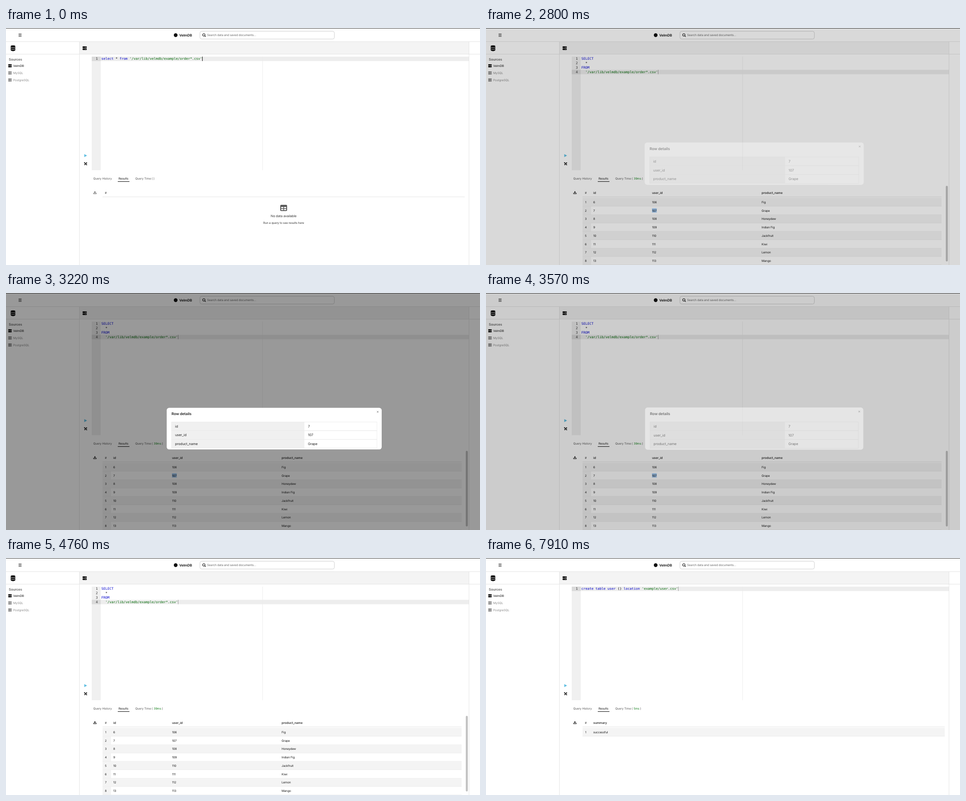
Recreate the animation shown at these times as an HTML page. Size 1056 by 530 pixels, loop 8000 ms.

```html
<!DOCTYPE html>
<html lang="en">
<head>
<meta charset="utf-8">
<title>Query editor</title>
<style>
html, body { margin: 0; width: 100%; height: 100%; overflow: hidden; background: #fff; }
svg { display: block; width: 1056px; height: 530px; }
text { font-family: Inter, "Noto Sans", sans-serif; letter-spacing: -.012em; white-space: pre; text-rendering: geometricPrecision; }
.code { font-family: "DejaVu Sans Mono", monospace; font-size: 7.46px; letter-spacing: 0; }
.key { fill: #00c; }
.str { fill: #036a07; }
</style>
</head>
<body>
<svg id="stage" viewBox="0 0 1056 530"></svg>
<script>
const LOOP = 8000, STEP = 70;
const LINE = 9.85, CHAR = 4.491, TOP = 64, CODE_X = 212.5;
const ROW = 18.75, TABLE_Y = 380;

const rect = (x, y, w, h, fill, extra = '') =>
  `<rect x="${x}" y="${y}" width="${w}" height="${h}" fill="${fill}" ${extra}/>`;
const path = (d, extra) => `<path d="${d}" ${extra}/>`;
const group = (id, body) => `<g id="${id}">${body}</g>`;
// y is the middle of the line
const label = (x, y, str, size = 6.5, fill = '#111', extra = '') =>
  `<text x="${x}" y="${y + size * .36}" font-size="${size}" fill="${fill}" ${extra}>${str}</text>`;
const bold = (x, y, str, size, fill) => label(x, y, str, size, fill, 'font-weight="600"');
const middle = (x, y, str, size, fill) => label(x, y, str, size, fill, 'text-anchor="middle"');
const key = s => `<tspan class="key">${s}</tspan>`;
const str = s => `<tspan class="str">${s}</tspan>`;

const code = lines => lines.map((line, i) => {
  const y = TOP + LINE * i + 7.3;
  return `<text class="code" x="${CODE_X}" y="${y}">${line}</text>` +
    `<text class="code" x="204.6" y="${y}" text-anchor="end" fill="#333">${i + 1}</text>`;
}).join('');

const server = (x, y, w, fill) => {
  const h = w * .4;
  return [0, h + w * .09].map(dy =>
    rect(x, y + dy, w, h, fill, `rx="${w * .12}"`) +
    [.66, .82].map(k => `<circle cx="${x + w * k}" cy="${y + dy + h / 2}" r="${w * .055}" fill="#fff"/>`).join('')
  ).join('');
};

const source = (name, y, fill) => server(5, y - 3.5, 7.8, fill) + label(16, y, name, 6.55, fill);

const database = () =>
  path('M10.4 41.2v7.6c0 3.9 10.4 3.9 10.4 0v-7.6z', 'fill="#111"') +
  '<ellipse cx="15.6" cy="41.1" rx="5.2" ry="2.3" fill="#111"/>' +
  [41.9, 45.8].map(y => path(`M10.2 ${y}c1 2.7 9.8 2.7 10.8 0`, 'fill="none" stroke="#fff" stroke-width=".8"')).join('');

const tools = () =>
  path('M175.4 301.4l4 4M179.6 301.2l-4.1 4.2', 'stroke="#111" stroke-width="1.3"') +
  path('M174 300.2l2 .3.3 2-1.4.2-1.1-1.2zM179 304.2l2 1.8-1.3 1.3-1.9-2z', 'fill="#111"') +
  path('M178.4 302.5l.3-2 1.3-.4-.3 1.3 1.3-.3-.3 1.3zM176.7 304.6l-.2 1.9-1.4.6.1-1.2-1.1.1.5-1.3z', 'fill="#111"');

const download = () =>
  path('M197.3 365h1.6v2.5h1.5l-2.3 2.2-2.3-2.2h1.5z', 'fill="#111"') +
  path('M195.1 368.6v2.2h6v-2.2', 'fill="none" stroke="#111" stroke-width="1.1"');

const frame = () =>
  rect(0, 0, 1056, 530, '#fff') +
  rect(163, 31, 869, 28, '#f4f4f4') +
  path('M0 30.5H1056M0 58.5H1056M163.5 31V530M1031.5 31V530', 'stroke="#e4e4e4" fill="none"') +
  path('M28 13.3h6.6M28 16h6.6M28 18.7h6.6', 'stroke="#111" stroke-width="1.1"') +
  '<circle cx="378" cy="16" r="4.2" fill="#111"/>' +
  bold(386, 16, 'VelmDB', 7.6) +
  rect(432, 7.3, 299.6, 17.4, '#fff', 'rx="4" stroke="#c9c9c9" stroke-width=".9"') +
  '<circle cx="440.8" cy="15.4" r="2.6" fill="none" stroke="#111" stroke-width="1.1"/>' +
  path('M442.7 17.3l2.3 2.3', 'stroke="#111" stroke-width="1.3"') +
  label(448, 16, 'Search data and saved documents...', 6.5, '#666') +
  database() + server(170.6, 41, 9.4, '#111') +
  bold(6.3, 70, 'Sources', 7.6, '#666') +
  source('VelmDB', 84.5, '#111') + source('MySQL', 100.5, '#888') + source('PostgreSQL', 116.3, '#888') +
  path('M174.4 281.9l6.2 3.4-6.2 3.4z', 'fill="#62bfe2"') + tools() +
  label(194.4, 336.5, 'Query History', 6.46, '#555') + label(250.8, 336.5, 'Results', 6.5) +
  rect(249, 342.8, 26, 1.1, '#111');

const editor = () =>
  rect(191, TOP, 20, 254, '#f0f0f0') +
  group('active', rect(191, TOP, 20, LINE, '#dadada') + rect(211, TOP, 820, LINE, '#ededed')) +
  rect(571.2, TOP, .9, 254, '#ebebeb') +
  group('selection', rect(211, TOP, 820, LINE * 4, '#fff') +
    rect(CODE_X, TOP, 1031 - CODE_X, LINE * 3, '#b5d5ff') +
    rect(CODE_X, TOP + LINE * 3, CHAR * 38, LINE, '#b5d5ff')) +
  group('typed', code([`${key('select')} * ${key('from')} ${str("'/var/lib/velmdb/example/order*.csv'")}`])) +
  group('formatted', code([key('SELECT'), '  *', key('FROM'), `  ${str("'/var/lib/velmdb/example/order*.csv'")}`])) +
  group('create', code([`${key('create table user')} () ${key('location')} ${str("'example/user.csv'")}`])) +
  rect(0, TOP, 1, LINE, '#000', 'id="caret"');

const rule = right => path(`M215 377.7H${right}`, 'stroke="#e4e4e4"');
const stripe = (i, right) => {
  const y = TABLE_Y + ROW * i;
  return rect(215, y, i % 2 ? 19 : right - 215, ROW, '#f4f4f4') +
    rect(215, y + ROW - .5, right - 215, .6, '#e6e6e6') +
    middle(222.2, y + 9.5, i + 1, 6.4);
};
const time = (value, end) => label(288, 336.5, 'Query Time (', 6.46, '#555') +
  label(329, 336.5, value, 6.46, '#0a7a12') + label(end, 336.5, ')', 6.46, '#555');

const empty = () =>
  label(288, 336.5, 'Query Time ( )', 6.46, '#555') + rule(1022) +
  rect(611, 395.6, 15.2, 13.6, '#555', 'rx="2"') +
  [[613, 400], [619.4, 400], [613, 404.4], [619.4, 404.4]].map(([x, y]) => rect(x, y, 4.8, 2.9, '#fff')).join('') +
  middle(618.5, 420.3, 'No data available', 7.25, '#333') +
  middle(618.5, 435.5, 'Run a query to see results here', 6.35, '#333');

const orders = () => {
  const fruit = ['Fig', 'Grape', 'Honeydew', 'Indian Fig', 'Jackfruit', 'Kiwi', 'Lemon', 'Mango'];
  const columns = [[239, 'id'], [370, 'user_id'], [614, 'product_name']];
  return time('39ms', 347.4) + rule(1015) +
    columns.map(([x, name]) => bold(x, 368.2, name, 6.85, '#333')).join('') +
    fruit.map((name, i) => {
      const y = TABLE_Y + ROW * i + 9.5;
      return stripe(i, 1015) +
        (i === 1 ? rect(369.8, y - 5, 10.6, 9.4, '#a3cbf5', 'id="picked"') : '') +
        label(239, y, i + 6) + label(370, y, i + 106) + label(614, y, name);
    }).join('') +
    rect(1024.4, 353, 4.4, 169, '#c1c1c1', 'rx="2"');
};

const summary = () => time('5ms', 343.2) + rule(1022) + bold(239, 368.2, 'summary', 6.85, '#333') +
  stripe(0, 1022) + label(239, TABLE_Y + 9.5, 'successful');

const modal = () => {
  const rows = [['id', '7'], ['user_id', '107'], ['product_name', 'Grape']];
  return rect(358, 256.8, 479, 93, '#fff', 'rx="5.5"') +
    bold(368.8, 270.3, 'Row details', 8.2, '#222') +
    path('M826.4 264l3.4 3.4M829.8 264l-3.4 3.4', 'stroke="#555" stroke-width=".8"') +
    rows.map(([name, value], i) => {
      const y = 288.5 + 19.4 * i;
      return rect(368.8, y, 296, 19.4, '#f0f0f0') +
        rect(368.8, y, 457.4, 19.4, 'none', 'stroke="#e6e6e6" stroke-width=".7"') +
        label(376.7, y + 9.7, name, 7.6, '#222') + label(672.7, y + 9.7, value, 7.5, '#222');
    }).join('');
};

document.getElementById('stage').innerHTML =
  frame() + editor() +
  group('download', download()) + middle(222.2, 368.2, '#', 6.5, '#333') +
  group('empty', empty()) + group('orders', orders()) + group('summary', summary()) +
  rect(0, 1, 1056, 529, '#000', 'id="mask"') + group('modal', modal()) +
  rect(0, 0, 1056, 1, '#333');

const el = id => document.getElementById(id);
const show = (id, on) => el(id).setAttribute('visibility', on ? 'visible' : 'hidden');
const within = (t, from, to) => t >= from && t < to;

// the CSS "ease" curve
function ease(x) {
  if (x <= 0) return 0;
  if (x >= 1) return 1;
  const bezier = (u, a, b) => 3 * u * (1 - u) ** 2 * a + 3 * u * u * (1 - u) * b + u ** 3;
  let low = 0, high = 1;
  for (let i = 0; i < 24; i++) {
    const mid = (low + high) / 2;
    if (bezier(mid, .25, .25) < x) low = mid; else high = mid;
  }
  return bezier(low, .1, 1);
}

// [start, column, line, focused]
const carets = [
  [0, 50, 0, true], [350, 50, 0, false], [1260, 6, 0, true], [1610, 6, 0, false],
  [2240, 38, 3, true], [2520, 38, 3, false], [4480, 38, 3, true], [4760, 38, 3, false],
  [6090, 38, 3, true], [6580, 48, 0, true], [7210, 48, 0, false]
];

function draw(now) {
  const t = Math.floor(now % LOOP / STEP) * STEP;

  show('typed', t < 1260);
  show('formatted', within(t, 1260, 6580));
  show('create', t >= 6580);
  show('selection', within(t, 6370, 6580));
  show('empty', t < 1750);
  show('orders', within(t, 1750, 7630));
  show('summary', t >= 7630);
  el('download').setAttribute('opacity', t < 1750 ? .65 : 1);
  el('picked').setAttribute('opacity', within(t, 2730, 3850) ? 1 : 0);

  const [, column, line, focused] = carets.filter(c => c[0] <= t).pop();
  el('active').setAttribute('transform', `translate(0 ${LINE * line})`);
  const caret = el('caret');
  caret.setAttribute('x', CODE_X + CHAR * column);
  caret.setAttribute('y', TOP + LINE * line);
  caret.setAttribute('opacity', focused ? 1 : .35);

  const open = ease((t - 2700) / 430) - ease((t - 3470) / 340);
  el('mask').setAttribute('opacity', .4 * open);
  el('modal').setAttribute('opacity', open);
  el('modal').setAttribute('transform',
    `translate(597.5 303.3) scale(${1 + .03 * (1 - open)}) translate(-597.5 -303.3)`);
}

const start = performance.now();
function tick() {
  draw(performance.now() - start);
  requestAnimationFrame(tick);
}
tick();
</script>
</body>
</html>
```
